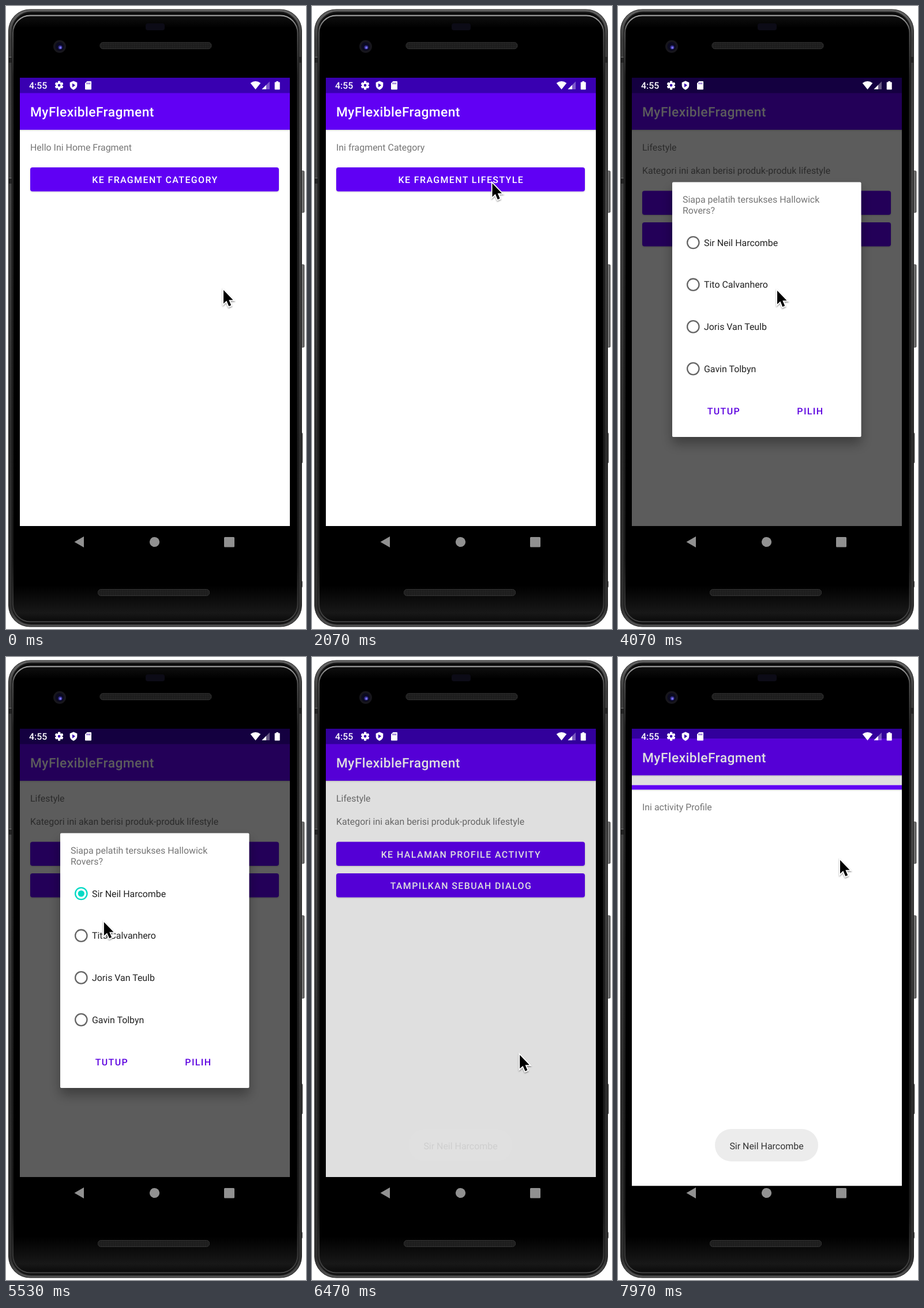
An HTML page that plays this animation: 520 px wide and 1077 px high, repeating every 8 s.

```html
<!DOCTYPE html>
<html lang="id">
<head>
<meta charset="utf-8">
<style>
  html, body { margin: 0; width: 100%; height: 100%; overflow: hidden; background: #fff; }
  svg { display: block; width: 520px; height: 1077px; font: 15.93px Roboto, sans-serif; fill: #757575;
    text-rendering: geometricPrecision; }
  .title { font-size: 22.8px; font-weight: 500; letter-spacing: .018em; fill: #fff; }
  .button { font-weight: 500; letter-spacing: 1.42px; text-anchor: middle; fill: #fff; }
  .flat { fill: #5c00e0; }
  .dark { fill: #212121; }
</style>
</head>
<body>
<svg id="stage" viewBox="0 0 520 1077" xmlns="http://www.w3.org/2000/svg"></svg>
<script>
const PURPLE = '#6100f4', LOOP = 8000, WINDOW_HEIGHT = 832;
const rect = (x, y, w, h, fill, extra = '') =>
  `<rect x="${x}" y="${y}" width="${w}" height="${h}" fill="${fill}" ${extra}/>`;
const circle = (x, y, r, fill, extra = '') =>
  `<circle cx="${x}" cy="${y}" r="${r}" fill="${fill}" ${extra}/>`;
const path = (d, fill = '#fff', extra = '') => `<path d="${d}" fill="${fill}" ${extra}/>`;
const text = (x, y, value, cls = '', extra = '') =>
  `<text x="${x}" y="${y}" class="${cls}" ${extra}>${value}</text>`;
const group = (id, body, extra = '') => `<g id="${id}" ${extra}>${body}</g>`;
const clip = (id, body) => `<clipPath id="${id}">${body}</clipPath>`;
const gradient = (id, stops, dir = 'x2="0" y2="1"') => `<linearGradient id="${id}" ${dir}>` +
  stops.map(([at, color, a = 1]) => `<stop offset="${at}" stop-color="${color}" stop-opacity="${a}"/>`).join('') +
  '</linearGradient>';

const button = (id, y, label) =>
  clip(id + 'Clip', rect(42, y, 431, 41.5, '#000', 'rx="4"')) +
  rect(42, y, 431, 41.5, PURPLE, 'rx="4" filter="url(#lift)"') +
  `<g clip-path="url(#${id}Clip)">${circle(0, 0, 0, '#fff', `id="${id}"`)}</g>` +
  text(258.4, y + 27, label, 'button');

const appBar = rect(24, 124, 468, 775, '#fff') + rect(24, 214, 468, 3, 'url(#barShadow)') +
  rect(24, 124, 468, 27, '#3900b1') + rect(24, 150.5, 468, 63.5, PURPLE) +
  text(42, 191, 'MyFlexibleFragment', 'title');

const choices = ['Sir Neil Harcombe', 'Tito Calvanhero', 'Joris Van Teulb', 'Gavin Tolbyn'];
const choice = (name, i) => {
  const y = 409 + i * 72.7;
  return circle(130.3, y, 10.2, 'none', `stroke="#666" stroke-width="2.3" id="ring${i}"`) +
    text(149, y + 5.7, name, 'dark');
};

const defs = `<defs>
  ${gradient('barShadow', [[0, '#000', .14], [1, '#000', 0]])}
  ${gradient('rim', [[0, '#666'], [.05, '#3c3c3c'], [.3, '#444'], [.7, '#2c2c2c'], [.97, '#303030'], [1, '#555']])}
  ${gradient('edge', [[0, '#aaa'], [.025, '#555'], [.1, '#252525'], [.9, '#181818'], [1, '#444']])}
  ${gradient('glass', [[0, '#101010'], [.02, '#000'], [.94, '#000'], [.985, '#181818'], [1, '#0a0a0a']])}
  ${gradient('key', [[0, '#333'], [.5, '#888'], [1, '#444']], 'x2="1" y2="0"')}
  <pattern id="mesh" width="3" height="3" patternUnits="userSpaceOnUse">
    ${rect(0, 0, 3, 3, '#191919')}${rect(0, 0, 1.5, 1.5, '#303030')}</pattern>
  <filter id="lift" x="-5%" y="-20%" width="110%" height="150%">
    <feDropShadow dx="0" dy="1" stdDeviation=".8" flood-opacity=".2"/></filter>
  <filter id="deep" x="-20%" y="-20%" width="140%" height="140%">
    <feDropShadow dx="0" dy="12" stdDeviation="10" flood-opacity=".33"/></filter>
  <filter id="pointerShadow" x="-50%" y="-50%" width="200%" height="200%">
    <feDropShadow dx="0" dy="1.5" stdDeviation="1.3" flood-opacity=".45"/></filter>
  ${clip('screen', rect(24, 124, 468, WINDOW_HEIGHT, '#000'))}
  ${clip('reveal', rect(24, 124, 468, WINDOW_HEIGHT, '#000', 'id="revealBox"'))}
  ${clip('pickClip', rect(264, 680, 138, 41, '#000', 'rx="4"'))}
</defs>`;

const sideKey = (y, h, w = 6) => rect(511, y, w, h, 'url(#key)', 'rx="1.5" stroke="#333" stroke-width=".7"');
const speaker = (x, y) => rect(x, y, 193, 11, 'url(#mesh)', 'rx="5" stroke="#333" stroke-width="1"');

const phone = sideKey(285, 72) + sideKey(447, 143) + sideKey(738, 52, 3) + sideKey(994, 11, 2.5) +
  rect(4.5, 6, 508, 1067, 'url(#rim)', 'rx="37" stroke="#202020"') +
  [88, 297].map(y => rect(5, y, 6, 10, '#242424') + rect(5, y, 6, 1, '#777')).join('') +
  rect(507, 88, 6, 10, '#242424') +
  rect(10.5, 10.5, 496.5, 1058, '#0b0b0b', 'rx="33" stroke="#1c1c1c" stroke-width="2"') +
  rect(12, 16.5, 493.5, 1048, 'url(#glass)', 'rx="30" stroke="url(#edge)" stroke-width="2"') +
  rect(242, 30, 33, 12, '#0c0b16', 'rx="4"') + speaker(163, 63) + speaker(159.5, 1008.5) +
  circle(93, 70, 11, '#17161c') + circle(93, 70, 7.5, '#0b0a20') +
  circle(94, 71.5, 3.6, '#302b86') + circle(94.3, 72, 2, '#7871ee');

const main = appBar +
  group('home', text(42, 250, 'Hello Ini Home Fragment') + button('homeRipple', 279, 'KE FRAGMENT CATEGORY')) +
  group('category', text(42, 250, 'Ini fragment Category') + button('categoryRipple', 279, 'KE FRAGMENT LIFESTYLE')) +
  group('lifestyle', text(42, 250, 'Lifestyle') +
    text(42, 290, 'Kategori ini akan berisi produk-produk lifestyle') +
    button('profileRipple', 319.5, 'KE HALAMAN PROFILE ACTIVITY') +
    button('dialogRipple', 374, 'TAMPILKAN SEBUAH DIALOG')) +
  rect(24, 124, 468, 775, '#000', 'id="shade"');

const dialog = rect(94, 304.5, 327.5, 440.5, '#fff', 'rx="2" filter="url(#deep)"') +
  text(112, 340, 'Siapa pelatih tersukses Hallowick') + text(112, 358.5, 'Rovers?') +
  circle(0, 0, 0, '#03dac5', 'id="radioRipple"') +
  choices.map(choice).join('') + circle(130.3, 409, 5.6, '#03dac5', 'id="radioDot"') +
  `<g clip-path="url(#pickClip)">${circle(0, 0, 0, PURPLE, 'id="pickRipple"')}</g>` +
  text(183.4, 706, 'TUTUP', 'button flat') + text(333.4, 706, 'PILIH', 'button flat');

const gear = Array.from({ length: 6 }, (_, i) =>
  rect(90, 129.8, 4.2, 14.6, '#fff', `rx="1" transform="rotate(${i * 60} 92.1 137.1)"`)).join('') +
  circle(92.1, 137.1, 5.4, '#fff') + circle(92.1, 137.1, 2.3, '#3900b1');

const statusIcons = text(40, 143, '4:55', '', 'style="font-weight:500;fill:#fff"') + gear +
  path('M117 129.5l6.3 2.8v4.5c0 4-2.7 6.7-6.3 8.2c-3.6-1.5-6.3-4.2-6.3-8.2v-4.5z') +
  path('M115 133.8l5.2 3.3l-5.2 3.3z', '#3900b1') +
  path('M140.5 130h6.5q1 0 1 1v12.5q0 1-1 1h-9q-1 0-1-1v-10z') +
  path('M140.3 132.5v2.7m2.5-2.7v2.7m2.5-2.7v2.7', 'none', 'stroke="#3900b1" stroke-width="1.1"') +
  path('M432.5 144.3l-8.8-11q8.8-6.8 17.6 0z') +
  path('M457 130.5v13.5h-13.5z', '#fff', 'opacity=".35"') + path('M451 136.5v7.5h-7.5z') +
  path('M468.5 130h3.4v1.5h2q.8 0 .8.8v11.4q0 .8-.8.8h-7.4q-.8 0-.8-.8v-11.4q0-.8.8-.8h2z');

const navIcons = path('M118.5 926.5L135 917v19z', '#919191') + circle(257.5, 926.5, 8.6, '#919191') +
  rect(378, 918, 18, 17.5, '#919191', 'rx="1.5"');

const pointer = path('M0 0V23.5L5.3 18.6L9.3 28L13.2 26.3L9.3 17.2H16.6Z', '#000',
  'stroke="#fff" stroke-width="3.4" paint-order="stroke" filter="url(#pointerShadow)"');

document.getElementById('stage').innerHTML = defs + phone +
  `<g clip-path="url(#screen)">${group('main', main) +
    group('profile', `<g clip-path="url(#reveal)">${rect(24, 899, 468, 57, '#000') + appBar +
      text(42, 250, 'Ini activity Profile')}</g>`)}</g>` +
  rect(24, 124, 468, 775, '#000', 'id="dim"') + group('dialog', dialog) + statusIcons + navIcons +
  group('toast', rect(168, 816, 179, 56, '#ececec', 'rx="28"') +
    text(257.5, 850.5, choices[0], '', 'text-anchor="middle" style="fill:#333"')) +
  group('pointer', pointer);

const el = Object.fromEntries([...document.querySelectorAll('[id]')].map(e => [e.id, e]));
const set = (e, attrs) => { for (const k in attrs) e.setAttribute(k, attrs[k]); };
const show = (e, on) => e.setAttribute('visibility', on ? 'visible' : 'hidden');
const span = (t, from, to) => Math.min(1, Math.max(0, (t - from) / (to - from)));
const smooth = p => p * p * (3 - 2 * p);

// Bézier easing: finds the parameter for x = p by bisection
const cubic = (s, [a, b, c, d]) =>
  a * (1 - s) ** 3 + 3 * b * s * (1 - s) ** 2 + 3 * c * s * s * (1 - s) + d * s ** 3;
function curve(p, xs, ys) {
  let lo = 0, hi = 1;
  for (let i = 0; i < 24; i++) {
    const mid = (lo + hi) / 2;
    if (cubic(mid, xs) < p) lo = mid; else hi = mid;
  }
  return cubic(lo, ys);
}
const fastOut = p => curve(p, [0, .4, .2, 1], [0, 0, 1, 1]);
const extraFastOut = p => p < 1 / 6
  ? curve(p, [0, .05, .1333, 1 / 6], [0, 0, .06, .4])
  : curve(p, [1 / 6, .2083, .25, 1], [.4, .82, 1, 1]);

const route = [
  [0, 377, 491], [150, 377, 491], [830, 312.5, 306.5], [2620, 312.5, 306.5], [3100, 307, 421],
  [3380, 307, 402], [3700, 307, 402], [4040, 276, 492], [4300, 276, 492], [4850, 132, 412],
  [5350, 132, 412], [6050, 360, 691], [6430, 360, 691], [7180, 385, 351], [LOOP, 385, 351]
];
function pointerAt(t) {
  const i = route.findIndex(stop => stop[0] > t);
  const [t0, x0, y0] = route[i - 1], [t1, x1, y1] = route[i];
  const p = smooth(span(t, t0, t1));
  return [x0 + (x1 - x0) * p, y0 + (y1 - y0) * p];
}

function ripple(e, t, start, x, y, size, strength) {
  const grow = 1 - (1 - span(t, start, start + 300)) ** 2;
  set(e, { cx: x, cy: y, r: size * grow,
    opacity: strength * span(t, start, start + 60) * (1 - span(t, start + 280, start + 520)) });
}

function draw(t) {
  show(el.home, t < 1350);
  show(el.category, t >= 1350 && t < 2580);
  show(el.lifestyle, t >= 2580);
  ripple(el.homeRipple, t, 1050, 313, 307, 275, .24);
  ripple(el.categoryRipple, t, 2250, 313, 307, 275, .24);
  ripple(el.dialogRipple, t, 3480, 307, 402, 275, .24);
  ripple(el.radioRipple, t, 4900, 130.3, 409, 23, .2);
  ripple(el.pickRipple, t, 6120, 361, 700, 77, .14);
  ripple(el.profileRipple, t, 7570, 385, 351, 350, .24);

  const checked = t >= 4920;
  el.ring0.setAttribute('stroke', checked ? '#03dac5' : '#666');
  set(el.radioDot, { r: 5.6 * span(t, 4920, 5070) });

  const open = span(t, 3680, 3830), close = span(t, 6216, 6366);
  const scale = .9 + .1 * smooth(open);
  set(el.dialog, { opacity: open * (1 - close),
    transform: `translate(257.5 525) scale(${scale}) translate(-257.5 -525)` });
  show(el.dialog, open > 0 && close < 1);
  set(el.dim, { opacity: .64 * span(t, 3680, 3880) * (1 - span(t, 6230, 6530)) });
  set(el.toast, { opacity: span(t, 6450, 6680) });

  // Activity transition: the old window drifts up and darkens, the new one is revealed from below
  const p = span(t, 7813, 8238), slide = fastOut(p);
  set(el.main, { transform: `translate(0 ${-.0205 * WINDOW_HEIGHT * slide})` });
  set(el.shade, { opacity: .12 * span(p, 0, .35) });
  show(el.profile, p > 0);
  set(el.profile, { transform: `translate(0 ${.041 * WINDOW_HEIGHT * (1 - slide)})` });
  set(el.revealBox, { y: 124 + .959 * WINDOW_HEIGHT * (1 - extraFastOut(p)) });

  set(el.pointer, { transform: `translate(${pointerAt(t)})` });
}

function tick() {
  draw(performance.now() % LOOP);
  requestAnimationFrame(tick);
}
tick();
</script>
</body>
</html>
```
